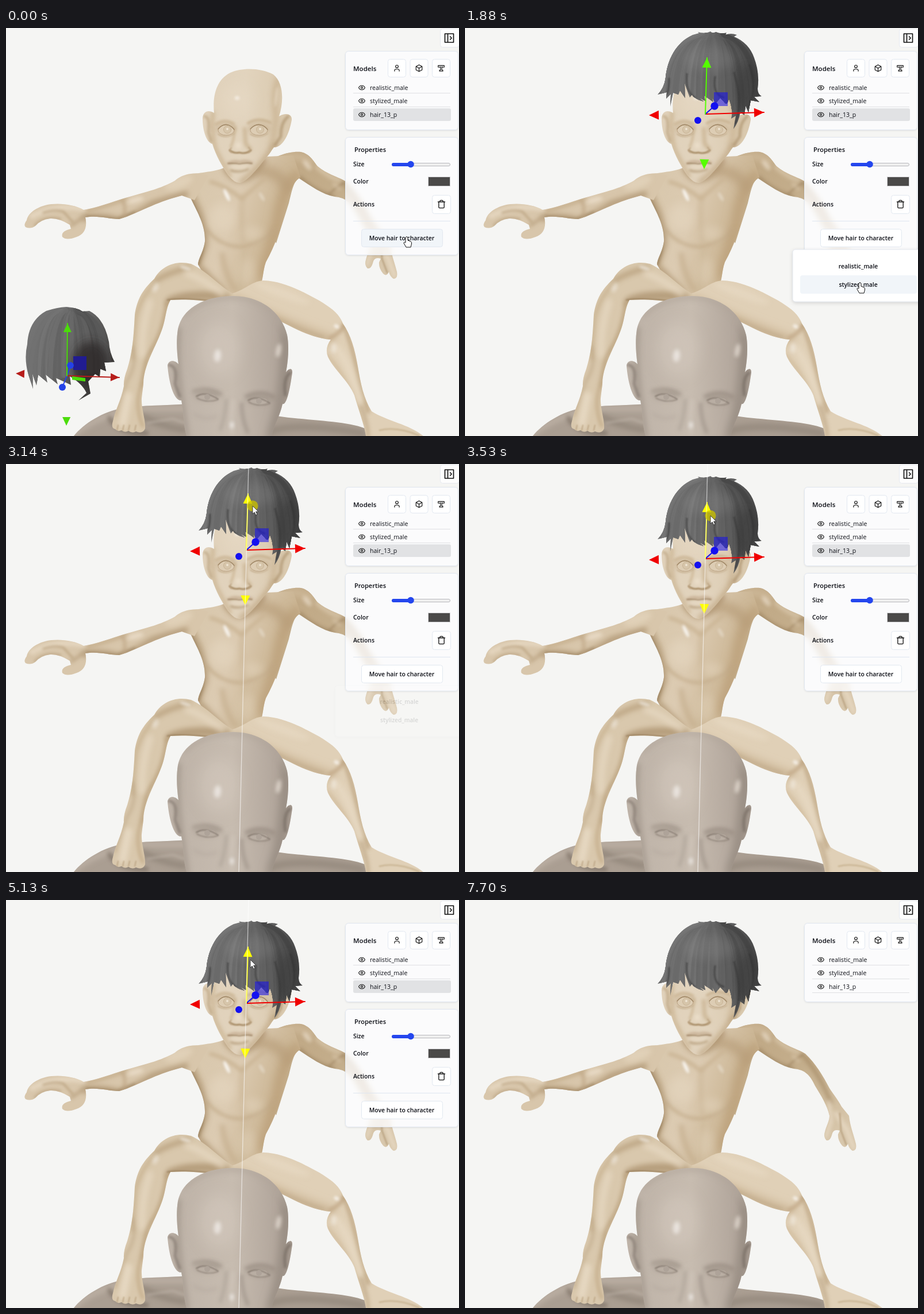
These frames come from a looping animation (788 px wide and 711 px high, 8.33 s). An HTML page:

```html
<!DOCTYPE html>
<html lang="en">
<head>
<meta charset="utf-8">
<title>Hair placement</title>
<style>
html, body { margin: 0; width: 100%; height: 100%; overflow: hidden; background: #f5f5f3; }
svg { position: absolute; left: 0; top: 0; }
.panel { position: absolute; left: 591px; width: 195px; box-sizing: content-box; margin: -1px 0 0 -1px;
  border: 1px solid #e1e7f0; border-radius: 6px; background: rgba(253, 253, 254, .8);
  backdrop-filter: blur(5px); box-shadow: 0 1px 3px rgba(0, 0, 0, .09); }
text { font: 10.5px "Open Sans", "Noto Sans", sans-serif; fill: #0b0d14; }
.bold { font-weight: 600; font-size: 10.4px; }
.line { fill: none; stroke-linecap: round; stroke-linejoin: round; }
</style>
</head>
<body>
<svg id="scene" width="788" height="711"></svg>
<div class="panel" style="top:41px;height:136px"></div>
<div class="panel" id="propsPanel" style="top:191px;height:204px"></div>
<svg id="ui" width="788" height="711"></svg>
<script>
const LOOP = 8330;
const $ = id => document.getElementById(id);
let seed = 7, clipCount = 0;
const random = () => (seed = seed * 16807 % 2147483647) / 2147483647;

const line = (d, color, width, blur = 0, opacity = 1) =>
  `<path class="line" d="${d}" stroke="${color}" stroke-width="${width}" opacity="${opacity}" ${blur ? `filter="url(#b${blur})"` : ''}/>`;
const glow = (x, y, rx, ry, color = '#fff', opacity = .7, blur = 3, turn = 0) =>
  `<ellipse rx="${rx}" ry="${ry}" fill="${color}" opacity="${opacity}" filter="url(#b${blur}l)" transform="translate(${x} ${y}) rotate(${turn})"/>`;
// A filled outline whose shading is clipped to its edge.
const part = (d, fill, ...shading) => {
  const id = 'clip' + clipCount++;
  return `<clipPath id="${id}"><path d="${d}"/></clipPath><path d="${d}" fill="${fill}"/><g clip-path="url(#${id})">${shading.join('')}</g>`;
};
const gradient = (id, vector, ...colors) => {
  const [x1, y1, x2, y2] = vector;
  return `<linearGradient id="${id}" gradientUnits="userSpaceOnUse" x1="${x1}" y1="${y1}" x2="${x2}" y2="${y2}">` +
    colors.map((c, i) => `<stop offset="${i / (colors.length - 1)}" stop-color="${c}"/>`).join('') + '</linearGradient>';
};

const defs = '<defs>' + [1, 2, 3, 5, 8, 12].map(b =>
  `<filter id="b${b}" filterUnits="userSpaceOnUse" x="-40" y="-40" width="870" height="800"><feGaussianBlur stdDeviation="${b}"/></filter>
   <filter id="b${b}l" x="-100%" y="-100%" width="300%" height="300%"><feGaussianBlur stdDeviation="${b}"/></filter>`).join('') +
  gradient('skin', [345, 0, 490, 0], '#e0d1ba', '#e2d4be', '#d9c8ad') +
  gradient('chest', [330, 250, 490, 300], '#d8c7ac', '#dccbb2', '#c9b391') +
  gradient('farArm', [480, 220, 660, 400], '#bfa784', '#c4ae8c', '#d8c7ac') +
  gradient('stone', [295, 0, 492, 0], '#beb3a8', '#c7bcb0', '#aca096') +
  gradient('hairTone', [340, 0, 512, 0], '#626262', '#777', '#656565', '#444') +
  gradient('wigTone', [36, 500, 185, 600], '#757575', '#707070', '#5a5958', '#3a3836') + '</defs>';

const SHADOW = '#b59d7b', DARK = '#927855', LIGHT = '#eaddc8';

const farArm = part(
  'M440 245C465 222 495 214 513 216C528 219 535 232 542 241C560 256 580 260 592 268C610 285 622 305 634 328C642 340 650 350 655 360L668 376C670 395 676 408 680 425Q682 437 674 437Q668 433 666 425Q662 434 656 428Q648 418 649 408L652 402Q640 398 638 410Q635 420 629 419Q623 413 626 404C628 395 634 385 634 376C630 358 620 342 609 324C600 305 592 296 572 294C550 290 530 275 510 262C500 265 496 290 492 305L470 375L440 330Z',
  'url(#farArm)',
  line('M512 262Q535 285 568 294', DARK, 8, 3, .55), line('M460 228Q495 216 530 232', '#cbb594', 14, 5),
  line('M542 243Q565 263 590 268', '#d3c0a2', 8, 3), line('M586 268Q615 300 636 352', '#a08560', 8, 3, .55),
  line('M562 290Q577 274 589 270', DARK, 3, 2, .5), line('M645 372L664 400L676 432', LIGHT, 8, 3, .7),
  line('M633 352L637 384L628 412', LIGHT, 7, 3, .7), line('M652 372L654 402L663 426', SHADOW, 3, 1, .7),
  glow(524, 239, 4, 11, '#f4eadb', .6, 3, -38), glow(575, 276, 3, 9, '#eadac2', .5, 3, -50));

const torso = part(
  'M385 240C370 252 335 250 316 258C300 275 312 288 322 298C335 325 347 345 346 372C343 392 335 400 334 412L375 485H445L440 456C448 440 446 425 452 408C468 380 482 340 488 308C492 285 500 268 512 260L500 222L455 224L430 235Z',
  'url(#chest)',
  line('M316 284C338 320 347 350 344 378L332 414L376 460', SHADOW, 14, 5, .9), line('M322 300Q348 350 341 390L334 412', DARK, 4, 2, .8),
  line('M505 258Q478 285 473 340L447 430', '#bda27d', 18, 8), line('M440 250Q470 245 492 280', '#b79d79', 18, 8, .8),
  line('M384 245Q410 286 446 232', '#ad936f', 13, 5, .85), line('M350 352Q374 382 411 381Q449 372 470 350', '#bfa785', 5, 3, .75),
  line('M412 292Q407 330 414 374', '#cab596', 5, 5), line('M376 394Q381 430 398 456', '#c0a886', 8, 5, .7),
  line('M414 390L408 456', '#cbb797', 5, 3, .7), line('M356 268Q385 276 410 298Q432 278 450 263', '#cbb595', 6, 3),
  glow(375, 330, 22, 25, LIGHT, .4, 8), glow(384, 291, 3, 12, '#fff', .8, 2, -25), glow(430, 358, 18, 12, LIGHT, .4, 8),
  glow(445, 294, 3, 9, '#fff', .3, 2, -30), glow(420, 425, 14, 25, LIGHT, .35, 8));

const nearArm = part(
  'M352 258C335 249 308 253 294 266C270 280 235 288 208 296C185 303 155 314 135 317C118 307 88 304 68 309C50 314 38 324 36 335Q30 343 34 347Q43 351 51 345Q60 334 77 332Q92 331 111 343L113 350Q95 354 98 364Q105 371 123 364C136 360 142 348 138 330C160 326 178 333 197 333C225 325 258 304 306 292L328 300Z',
  '#d8c6ab',
  line('M137 331Q165 326 195 335Q225 328 256 306L312 290', SHADOW, 11, 5), line('M140 328L194 333L224 321', DARK, 3, 2, .6),
  line('M139 319Q180 309 209 297', '#bea581', 6, 3, .7), line('M201 299Q210 309 205 331', '#bda483', 4, 3),
  line('M136 315Q85 306 45 328', LIGHT, 9, 3, .7), line('M65 322Q85 315 100 320L116 338', '#b09672', 3, 2, .7),
  line('M50 344Q68 326 95 333', SHADOW, 3, 2, .8), line('M114 344L134 330', SHADOW, 5, 3, .8),
  glow(300, 270, 26, 10, '#e6d8c1', .6, 5, -20), glow(225, 300, 15, 5, '#f2e6d5', .6, 3, -15));

const farLeg = part(
  'M380 466C415 460 425 441 448 440C485 441 520 462 545 475C566 488 580 498 586 515C600 535 607 560 612 590C617 620 622 645 636 668C665 686 700 690 726 711H626C623 690 613 665 606 640C596 615 570 595 560 573Q554 558 565 543C530 540 500 522 475 510L400 490Z',
  '#e0d0b7',
  line('M400 474Q470 510 565 544', '#cbb595', 16, 8), line('M440 488Q495 522 552 539', SHADOW, 5, 3, .5),
  line('M562 541Q585 530 590 514', '#c2a988', 6, 3), line('M588 518Q605 560 615 615L630 668', '#b9a07d', 7, 3, .75),
  line('M558 570Q600 615 620 690', '#c6ae8b', 5, 3, .6), line('M572 553Q598 585 616 648', LIGHT, 12, 5, .6),
  line('M618 660Q628 684 630 711', SHADOW, 6, 3, .6), line('M650 701Q680 694 718 710', '#cdb999', 3, 1),
  glow(575, 520, 5, 3, '#fff', .7, 2, 30), glow(480, 462, 52, 8, LIGHT, .5, 5, 20), glow(570, 558, 4, 9, '#fff', .4, 3));

const nearLeg = part(
  'M400 466C370 450 352 425 322 411C295 404 270 415 258 437C240 454 228 470 224 500C222 540 220 565 211 594Q204 612 205 624C200 650 190 665 186 685Q182 698 190 699Q194 704 201 701Q207 706 213 702Q220 707 226 703Q238 708 242 698C243 682 235 663 236 645L239 620C239 585 265 550 274 517C279 498 279 487 286 474C310 472 335 474 365 478H395Z',
  '#d9c8ad',
  line('M286 476Q320 461 382 470', SHADOW, 16, 5), line('M281 474Q310 470 370 477', DARK, 3, 1, .6),
  line('M260 440Q285 425 318 418', '#ab9069', 7, 5, .75), line('M258 445Q235 470 225 505L220 575', '#c4ad8a', 7, 3, .6),
  line('M280 480Q276 530 246 573L236 625', '#b59b76', 8, 3, .7), line('M220 555Q229 588 210 616L190 675', SHADOW, 5, 3, .5),
  line('M250 478Q234 530 237 570', LIGHT, 12, 5, .6), line('M315 427Q348 440 376 463', LIGHT, 12, 5, .6),
  line('M213 640L203 690', LIGHT, 13, 5, .8), line('M234 628Q224 660 238 694', '#c3ab88', 5, 3),
  ...[195, 205, 215, 226].map(x => line(`M${x} 692l-2 9`, SHADOW, 1.5, 1)),
  glow(312, 418, 10, 3, '#fff', .5, 2, 15), glow(260, 452, 4, 9, '#fff', .45, 3, 25));

const eye = (x, y, r) =>
  glow(x, y - 2, r + 4, 11, '#c2ab8a', .55, 3) +
  `<ellipse cx="${x}" cy="${y}" rx="${r}" ry="9" fill="#ddcdb4" stroke="#bba384" stroke-width="1"/>
   <circle cx="${x + 2}" cy="${y - 1}" r="6.5" fill="#d6c5aa" stroke="#c0aa8a" stroke-width=".7"/>
   <circle cx="${x + 2}" cy="${y - 2}" r="2" fill="#eee3d1"/>` +
  line(`M${x - r} ${y - 2}Q${x} ${y - 18} ${x + r} ${y - 1}`, '#a08867', 1.3) + line(`M${x - r} ${y + 7}Q${x} ${y + 16} ${x + r} ${y + 6}`, '#c3ad8d', 1.5, 1);

const figureHead = part(
  'M362 148C352 142 343 145 342 157C342 178 348 199 359 202C365 222 376 241 386 256Q398 271 407 270C420 267 438 244 450 229C459 220 463 211 466 208C482 208 493 184 497 160C498 149 485 147 475 154C484 125 482 95 465 81C445 70 412 68 390 78C366 90 359 118 362 148Z',
  'url(#skin)',
  line('M476 85Q463 110 470 155L463 210', '#c8b18f', 9, 5, .8), line('M360 148Q357 180 364 210L389 258', '#cab492', 7, 3, .8),
  line('M466 206Q452 228 433 248L409 269', '#bca27e', 8, 5, .8), line('M345 154Q355 153 352 182L357 198', '#b0966f', 3, 2, .8),
  line('M491 154Q478 164 478 189L468 204', '#a78c66', 4, 2, .8), line('M365 168Q380 157 396 167', '#cbb493', 4, 2),
  line('M421 166Q438 155 460 165', '#c6af8c', 4, 2), line('M398 172Q397 195 391 207', '#cfba9a', 4, 2),
  line('M415 175L417 202L425 211', '#c6af8c', 5, 3), eye(383, 178, 14), eye(440, 178, 15),
  line('M389 213Q396 219 406 217Q418 220 426 213', '#a88d68', 3, 1), line('M392 209q-5 4 0 8M422 208q6 5 0 9', '#bda483', 2, 1),
  line('M387 236Q397 231 406 234Q418 230 427 235', '#bda385', 5, 2, .7), line('M386 236Q397 235 406 237Q418 234 428 236', '#937959', 1.5, 1),
  line('M391 248Q405 253 421 246', '#b39a77', 3, 2), glow(406, 242, 13, 3, '#e6d8c3', .8, 2),
  glow(402, 122, 4, 3, '#fff', .9, 2), glow(404, 205, 5, 6, '#eee1cd', .8, 3), glow(470, 120, 2, 18, '#f2e7d7', .5, 2, 6),
  glow(401, 125, 28, 30, '#e9dcc8', .4, 12));

const shoulders = part(
  'M118 711C135 690 168 668 205 662C245 657 280 658 318 655L470 676C530 685 595 684 630 700L656 711Z', '#aa9e92',
  line('M115 711Q160 670 245 663H315', '#bdb1a5', 9, 5), line('M235 676Q270 694 310 700', '#857a6e', 10, 5, .6),
  line('M180 680Q192 706 244 706', '#776b5f', 8, 3, .6), line('M455 705Q500 685 620 706', '#8b8075', 12, 5, .6),
  line('M247 688L290 681L310 688', '#bdb2a7', 4, 2, .6));

const calmEye = (x, y) =>
  glow(x, y - 3, 22, 8, '#94897e', .5, 5) + `<ellipse cx="${x}" cy="${y}" rx="15" ry="6" fill="#b9aea3"/>` +
  line(`M${x - 19} ${y - 1}Q${x - 2} ${y - 11} ${x + 19} ${y + 4}`, '#7b7066', 1.6, 1) +
  line(`M${x - 18} ${y + 2}Q${x} ${y + 11} ${x + 18} ${y + 5}`, '#91857b', 1.4, 1) +
  `<circle cx="${x}" cy="${y}" r="5" fill="#aea399"/>`;

const stoneHead = part(
  'M300 586C295 579 283 577 281 588C283 615 291 650 305 649C309 667 308 690 314 711H462C467 690 477 675 481 655C488 658 494 630 498 600C498 591 491 594 487 600C492 574 492 550 489 535C478 491 439 467 395 467C345 467 306 489 299 525C296 545 297 563 300 586Z',
  'url(#stone)',
  line('M300 525Q296 580 304 640L314 711', '#a1968b', 9, 5, .8), line('M488 520Q488 600 475 670L462 711', '#92877d', 14, 8),
  line('M312 500Q350 465 410 470Q465 480 488 532', '#b0a59a', 8, 5, .6), line('M284 587Q299 589 294 620L302 642', '#81766d', 4, 2, .8),
  line('M494 601Q482 610 486 640', '#72675f', 4, 2, .8), line('M326 633Q350 624 374 638', '#a09489', 5, 3, .8),
  line('M418 642Q445 630 466 643', '#95897f', 5, 3, .8), calmEye(350, 643), calmEye(440, 650),
  line('M383 648Q382 675 373 700', '#aaa095', 5, 3, .7), line('M410 655Q410 680 420 704', '#9c9187', 6, 3, .7),
  line('M395 650Q391 680 393 705', '#cfc4b9', 7, 3, .7), line('M328 673Q346 685 365 677', '#b5aaa0', 4, 3, .7),
  glow(368, 571, 6, 11, '#fff', .95, 3, 5), glow(474, 562, 4, 12, '#eee5dc', .75, 3, 10),
  glow(370, 560, 35, 48, '#d6cbc0', .5, 12), glow(393, 692, 3, 6, '#fff', .7, 3));

// Locks fan from the crown to an edge given by a function of x.
const locks = (count, crownX, crownY, left, right, edge, tone) => {
  let out = '';
  for (let i = 0; i < count; i++) {
    const u = random(), x = left + u * (right - left), shade = Math.round(tone(u) + (random() - .5) * 24);
    out += line(`M${crownX + (u - .5) * 35} ${crownY + random() * 7}Q${x} ${crownY + 15} ${x + (random() - .5) * 9} ${edge(u)}`,
      `rgb(${shade},${shade},${shade})`, 2 + random() * 7, 0, .5);
  }
  return out;
};
const headHair = part(
  'M396 12L407 9L405 7Q418 11 427 6Q430 10 436 7Q446 11 455 8L453 12Q462 8 473 12L468 15Q494 26 503 52Q513 79 509 106Q509 115 516 119L503 120L512 129L497 126L493 147L488 135L486 152L479 147Q476 164 467 176L471 153L463 158Q467 144 459 123Q456 138 450 128L444 122L436 132L430 122L432 129L416 118L418 127L408 122L415 128Q397 123 395 116L391 121L382 96L383 122L374 109L371 116L362 113L357 137L358 115L350 123L351 112L335 116Q347 104 349 86C352 56 367 25 396 12Z',
  'url(#hairTone)', locks(130, 431, 10, 342, 510, u => 126 + 20 * u, u => 112 - 46 * u * u),
  line('M355 88Q355 117 346 119M386 80Q383 112 400 121M435 85Q430 116 450 121M468 78Q484 130 470 166M495 65Q509 103 493 138', '#343434', 3, 1, .55),
  glow(425, 53, 45, 21, '#999', .22, 8), glow(489, 104, 15, 42, '#2d2d2d', .4, 8));
const looseHair = part(
  'M105 486Q88 487 70 493Q39 510 37 551Q31 577 39 604L47 629L46 602L53 623L56 604L72 618L69 604L90 621L87 610L113 622L111 607Q133 620 140 636L126 649L147 637L143 616L155 603L163 608L164 594L174 598L171 583L189 582Q180 566 179 547Q171 506 145 493L133 494Q123 487 105 486Z',
  'url(#wigTone)', locks(110, 112, 490, 39, 181, u => 615 - 22 * u, u => 118 - 36 * u),
  glow(148, 588, 32, 42, '#2d2b29', .85, 8));

const cone = (x, y, color, size) =>
  `<path d="M0 0L-17 8V-8Z" fill="${color}" transform="translate(${x} ${y}) rotate(${Math.atan2(y, x) * 180 / Math.PI}) scale(${size})"/>`;
const gizmo = (id, { up, down, right, left, near, far, square, red, blue, green, alpha, size = 1, extra = '' }) => `<g id="${id}">
  ${line(`M0 0L${right}`, red, 2)}${line(`M0 0L${far}`, blue, 2)}${extra}
  <rect x="${square[0]}" y="${square[1]}" width="24" height="24" fill="${blue}" opacity="${alpha}"/>
  ${cone(...right, red, size)}${cone(...left, red, size)}
  <g class="yAxis" color="${green}">${line(`M0 0L${up}`, 'currentColor', 2)}${cone(...up, 'currentColor', size)}${cone(...down, 'currentColor', size)}</g>
  <circle cx="${far[0]}" cy="${far[1]}" r="${6.7 * size}" fill="${blue}"/><circle cx="${near[0]}" cy="${near[1]}" r="6" fill="${blue}"/></g>`;

$('scene').innerHTML = defs + '<rect width="788" height="711" fill="#f5f5f3"/>' +
  farArm + torso + nearArm + shoulders + farLeg + nearLeg + figureHead + stoneHead +
  `<g id="loose">${looseHair}<g transform="translate(106 606)">` +
  gizmo('looseGizmo', { up: [1, -91], down: [-1, 87], right: [91, 3], left: [-89, -4], near: [-8, 20], far: [6, -18],
    square: [11, -34], red: '#b71d1a', blue: '#2442e8', green: '#4bdc0a', alpha: 0, size: .88,
    extra: '<path d="M11-34h23v24H11Z" fill="#211c91"/><path d="M9 1l23 3v6l-23-3Z" fill="#4bdc0a"/>' + line('M0 0L-8 20', '#2442e8', 2) }) +
  `</g></g><g id="worn">${headHair}<g transform="translate(418 150)">` +
  gizmo('wornGizmo', { up: [3, -98], down: [-2, 96], right: [102, -3], left: [-98, 2], near: [-13, 11], far: [16, -14],
    square: [15, -38], red: '#f00000', blue: '#1410f0', green: '#55ff00', alpha: .55 }) +
  '</g></g><path id="guide" d="M422 0L405 711" stroke="#fff" stroke-width="1.3" opacity=".6"/>';

const box = (x, y, w, h, fill = '#fff', stroke = '#e2e8f0', extra = '') =>
  `<rect x="${x + .5}" y="${y + .5}" width="${w - 1}" height="${h - 1}" rx="4" fill="${fill}" stroke="${stroke}" ${extra}/>`;
const label = (x, y, words, extra = '') => `<text x="${x}" y="${y}" ${extra}>${words}</text>`;
const BOLD = 'class="bold"', CENTERED = 'class="bold" text-anchor="middle"';
const icon = (x, y, size, d) =>
  `<g transform="translate(${x - size / 2} ${y - size / 2}) scale(${size / 24})">${line(d, '#111', 2)}</g>`;
const ICONS = {
  eye: 'M2 12S5 5 12 5 22 12 22 12 19 19 12 19 2 12 2 12ZM15 12a3 3 0 1 1-6 0a3 3 0 1 1 6 0',
  person: 'M16 7a4 4 0 1 1-8 0a4 4 0 1 1 8 0M5 21v-2a4 4 0 0 1 4-4h6a4 4 0 0 1 4 4v2',
  cube: 'M12 2L21 7V17L12 22L3 17V7ZM3 7L12 12L21 7M12 12V22',
  letter: 'M3 9V4H21V9H15V8H14V18H17V21H7V18H10V8H9V9Z',
  bin: 'M3 6H21M19 6V20Q19 22 17 22H7Q5 22 5 20V6M8 6V4Q8 2 10 2H14Q16 2 16 4V6',
  drawer: 'M3 3H21V21H3ZM9 3V21M14 9L17 12L14 15'
};
const rule = (y, color = '#dfe0e3') => `<path d="M604 ${y}.5H773" stroke="${color}"/>`;

$('ui').innerHTML =
  box(755, 1, 34, 33, '#fdfdfd', '#e6e9ef') + icon(771, 17.5, 20, ICONS.drawer) +
  label(604, 75, 'Models', 'class="bold" style="font-size:11.5px"') +
  ['person', 'cube', 'letter'].map((name, i) => box(664 + i * 38.5, 54, 32, 32) + icon(680 + i * 38.5, 70, 14, ICONS[name])).join('') +
  rule(113) + rule(137) + `<g id="rowEnd">${rule(161)}</g><rect id="rowFill" x="604" y="140" width="170" height="22" rx="3" fill="#e1e2e4"/>` +
  ['realistic_male', 'stylized_male', 'hair_13_p'].map((name, i) => {
    const y = Math.floor(104 + i * 23.5);
    return icon(619, y, 13, ICONS.eye) + label(633, y + 4, name);
  }).join('') +
  `<g id="props">${label(606, 216, 'Properties', 'class="bold" style="font-size:11px"')}
    ${label(604, 241, 'Size', BOLD)}${label(604, 271, 'Color', BOLD)}${label(604, 311, 'Actions', BOLD)}
    <rect x="671.5" y="235.5" width="101" height="5" rx="2.5" fill="#efefef" stroke="#b9b9bd"/>
    <rect x="671" y="235" width="34" height="6" rx="3" fill="#2446ee"/><circle cx="704" cy="237.5" r="5.8" fill="#2446ee"/>
    <rect x="734.5" y="259.5" width="38" height="16" fill="#4b4a49" stroke="#d3d3d5"/>
    ${box(741, 291, 33, 33)}${icon(757.5, 307, 16, ICONS.bin)}${rule(336, '#dfe6f0')}
    ${box(618, 350, 142, 32, '#fff', '#e2e8f0', 'id="moveButton"')}${label(688.5, 370, 'Move hair to character', CENTERED)}</g>
  <g id="menu"><rect x="570" y="386" width="236" height="91" rx="5" fill="#fff" stroke="#e4e8ef" style="filter:drop-shadow(0 2px 3px #0002)"/>
    <rect class="option" x="583" y="399" width="203" height="32" rx="4"/><rect class="option" x="583" y="431" width="203" height="32" rx="4"/>
    ${label(684, 419, 'realistic_male', CENTERED)}${label(684, 451, 'stylized_male', CENTERED)}</g>
  <g id="cursor"><circle id="press" r="9.5" fill="#c9c000" opacity=".78"/>
    <path id="arrow" d="M0 0V14L3.3 11L5.6 16L8 15L5.6 10H10Z" fill="#fff" stroke="#333" stroke-width=".9"/>
    <path id="hand" d="M-2 1Q0-2 2 1V6L7 8Q9 9 8.5 12L7 18H-1L-5 11Q-5 8-2 10Z" fill="#fff" stroke="#111" stroke-width="1"/></g>`;

const smooth = u => u * u * (3 - 2 * u);
const track = (t, keys) => {
  const next = keys.findIndex(k => k[0] > t);
  if (next < 0) return keys.at(-1).slice(1);
  if (!next) return keys[0].slice(1);
  const a = keys[next - 1], b = keys[next], u = (t - a[0]) / (b[0] - a[0]);
  return a.slice(1).map((v, i) => v + (b[i + 1] - v) * u);
};
const PATH = [[870, 697, 364], [1350, 687, 444], [2050, 687, 444], [2780, 430, 76], [2890, 429, 73], [3140, 429, 73],
  [3530, 427, 90], [4080, 425, 104], [5990, 425, 104], [6370, 581, 431], [6740, 701, 632], [7410, 701, 632], [7700, 740, 714]];
const DROP = [[3140, 0], [3530, 15], [3950, 29], [4080, 30]];
const PRESSES = [[90, 170], [1790, 1880], [3140, 5130], [6910, 7010]];
const show = (id, on) => { $(id).style.display = on ? '' : 'none'; };

function render(t) {
  const [x, y] = track(t, PATH), worn = t >= 1880, selected = t < 7010;
  const hot = t >= 2750 && t < 6040;
  show('loose', !worn);
  show('worn', worn);
  show('wornGizmo', selected);
  show('guide', hot);
  $('worn').setAttribute('transform', `translate(0 ${track(t, DROP)[0]})`);
  document.querySelector('#wornGizmo .yAxis').setAttribute('color', hot ? '#ffff00' : '#55ff00');

  for (const id of ['props', 'propsPanel', 'rowFill']) show(id, selected);
  show('rowEnd', !selected);
  $('moveButton').setAttribute('fill', y < 382 && x > 618 ? '#f1f5f9' : '#fff');

  const open = smooth(Math.min(1, Math.max(0, (t - 140) / 190)));
  const closing = t >= 3140, scale = closing ? .98 : .95 + .05 * open;
  show('menu', t >= 150 && t < 3230);
  $('menu').setAttribute('opacity', closing ? .13 : open);
  $('menu').setAttribute('transform', `translate(688 386) scale(${scale}) translate(-688 -386)`);
  document.querySelectorAll('.option').forEach((row, i) => {
    const top = 399 + i * 32;
    row.setAttribute('fill', x > 583 && y >= top && y < top + 32 ? '#f1f5f9' : '#fff');
  });

  const pointing = t < 2050 || (t < 2800 && x > 583 && y > 399);
  show('hand', pointing);
  show('arrow', !pointing);
  show('press', PRESSES.some(([from, to]) => t >= from && t < to));
  show('cursor', t < 7700);
  $('cursor').setAttribute('transform', `translate(${x} ${y})`);
}

const start = performance.now();
function tick() {
  render((performance.now() - start) % LOOP);
  requestAnimationFrame(tick);
}
tick();
</script>
</body>
</html>
```
